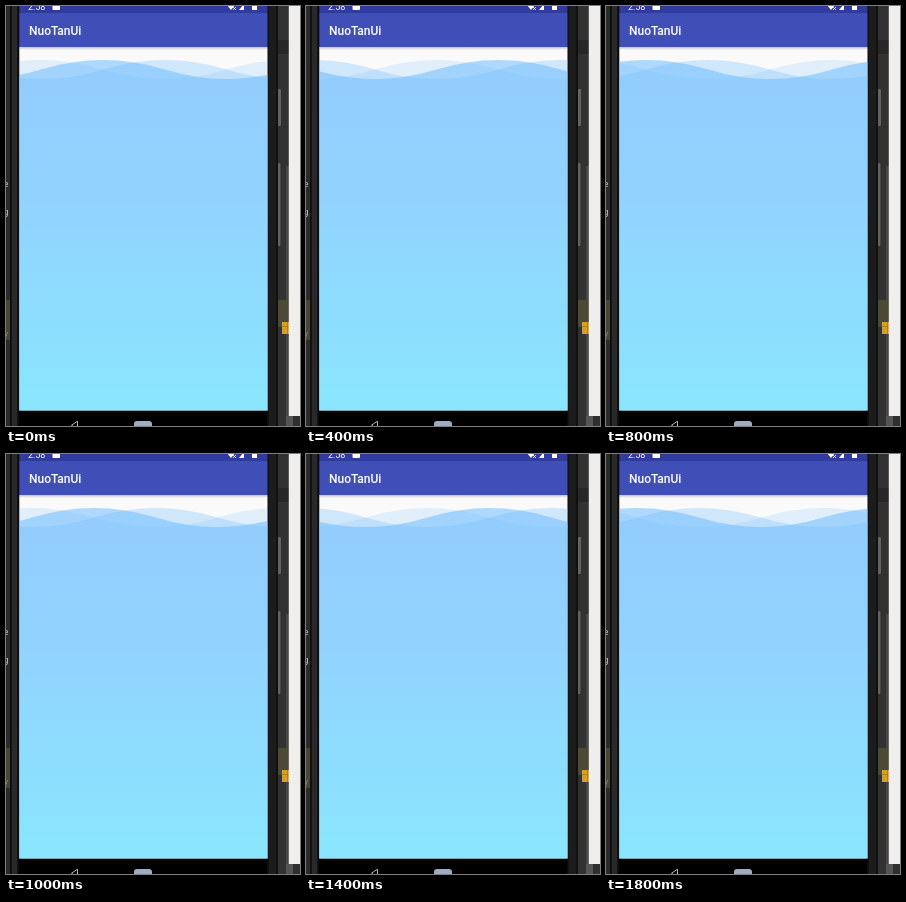
An HTML page that plays this animation: 294x420 px, repeating every 1900 ms.

```html
<!DOCTYPE html>
<html lang="en">
<head>
<meta charset="utf-8">
<title>Wave screen</title>
<style>
  html, body { margin: 0; width: 100%; height: 100%; overflow: hidden; background: #2b2b2b; }
  svg { display: block; width: 294px; height: 420px; }
  text { font-family: Roboto, sans-serif; fill: #fff; }
  .code { font-family: "DejaVu Sans", sans-serif; font-size: 9px; fill: #c3c6c9; }
</style>
</head>
<body>
<svg viewBox="0 0 294 420">
  <defs>
    <linearGradient id="water" gradientUnits="userSpaceOnUse" x1="0" y1="54" x2="0" y2="404">
      <stop offset="0" stop-color="#6dbbff"/>
      <stop offset=".4" stop-color="#6cc5ff"/>
      <stop offset="1" stop-color="#62dfff"/>
    </linearGradient>
    <linearGradient id="shade" x1="0" y1="0" x2="0" y2="1">
      <stop offset="0" stop-opacity=".22"/>
      <stop offset="1" stop-opacity="0"/>
    </linearGradient>
    <clipPath id="screen"><rect x="13.3" y="0" width="248.2" height="404.4"/></clipPath>
  </defs>

  <!-- Desktop behind the phone -->
  <rect width="294" height="420" fill="#2b2b2b"/>
  <rect y="294" width="5" height="40" fill="#4a4835"/>
  <text class="code" x="-3" y="181">e</text>
  <text class="code" x="-3" y="209">g</text>
  <text class="code" x="-3" y="331" fill-opacity=".5">v</text>
  <rect x="272" width="11" height="420" fill="#323232"/>
  <rect x="272" y="34" width="11" height="14" fill="#272727"/>
  <rect x="280" y="160" width="3" height="250" fill="#474747"/>
  <rect x="271" y="294" width="13" height="27" fill="#4c4934"/>
  <rect x="276" y="316" width="8" height="12" fill="#d8a01f"/>
  <path d="M276 320.5h5M281.5 316v12" stroke="#a87812" stroke-width=".8"/>
  <rect x="282.8" width="11.2" height="410" fill="#f0eeed"/>
  <rect x="283" y="410" width="11" height="10" fill="#303030"/>
  <rect x="280" y="410" width="7" height="10" fill="#555"/>

  <!-- Phone body -->
  <rect x="4" width="268" height="420" fill="#1c1c1c"/>
  <rect x="4" width="1.5" height="420" fill="#0c0c0c"/>
  <rect x="6" width="5" height="420" fill="#292929"/>
  <rect x="11.5" width="251" height="420" fill="#0b0b0b"/>
  <rect x="270" width="2" height="420" fill="#111"/>
  <rect x="272" y="83" width="3" height="37" rx="1" fill="#636363"/>
  <rect x="272" y="157" width="2.4" height="83" rx="1" fill="#636363"/>
  <rect x="13" y="404" width="248" height="16" fill="#000"/>

  <!-- App -->
  <g clip-path="url(#screen)">
    <rect x="13" y="41" width="249" height="364" fill="#fafafa"/>
    <g fill="url(#water)">
      <path id="tail" fill-opacity=".18"/>
      <path id="lead" fill-opacity=".3"/>
      <path id="main" fill-opacity=".54"/>
    </g>
    <rect x="13" y="41" width="249" height="3" fill="url(#shade)"/>
    <rect x="13" y="7" width="249" height="34" fill="#3f4fb7"/>
    <rect x="13" width="249" height="7" fill="#303b9f"/>
    <text x="22" y="3.5" font-size="9">2:58</text>
    <g fill="#fff">
      <rect x="46.5" y="-3" width="7.5" height="7" rx="1"/>
      <path d="M221 -1h8l-4 5zM233 4h5v-6zM246 -2h5v6h-5z"/>
      <path d="M227 1l3 3m0-3l-3 3" stroke="#fff" stroke-width=".8"/>
    </g>
    <text x="23" y="28.5" font-size="12" font-weight="500">NuoTanUi</text>
  </g>

  <!-- Navigation bar -->
  <path d="M71.5 415.2v8l-6-4z" fill="none" stroke="#b5b5b5"/>
  <rect x="128" y="415" width="18" height="8" rx="3" fill="#9fabc0"/>
</svg>
<script>
  const LOOP = 1900, STEP = 100;
  const WIDTH = 248, QUARTER = WIDTH / 4;
  const LEVEL = 63.5, HEIGHT = 19;
  const CREST = 97, SPEED = WIDTH / 1038;
  const waves = [
    [document.getElementById('tail'), -QUARTER],
    [document.getElementById('lead'), QUARTER],
    [document.getElementById('main'), 0]
  ];

  // Water body whose wave crest lies at x.
  function wavePath(x) {
    const half = WIDTH / 2;
    const start = x - QUARTER - 2 * WIDTH;
    return `M${start} ${LEVEL}q${QUARTER} ${-HEIGHT} ${half} 0` +
      `t${half} 0`.repeat(7) + `V405H${start}z`;
  }

  function draw(time) {
    const t = Math.floor(time % LOOP / STEP) * STEP;
    const crest = (CREST + SPEED * t) % WIDTH;
    for (const [path, offset] of waves) {
      path.setAttribute('d', wavePath(crest + offset));
    }
  }

  const begin = performance.now();
  function tick() {
    draw(performance.now() - begin);
    requestAnimationFrame(tick);
  }
  tick();
</script>
</body>
</html>
```
